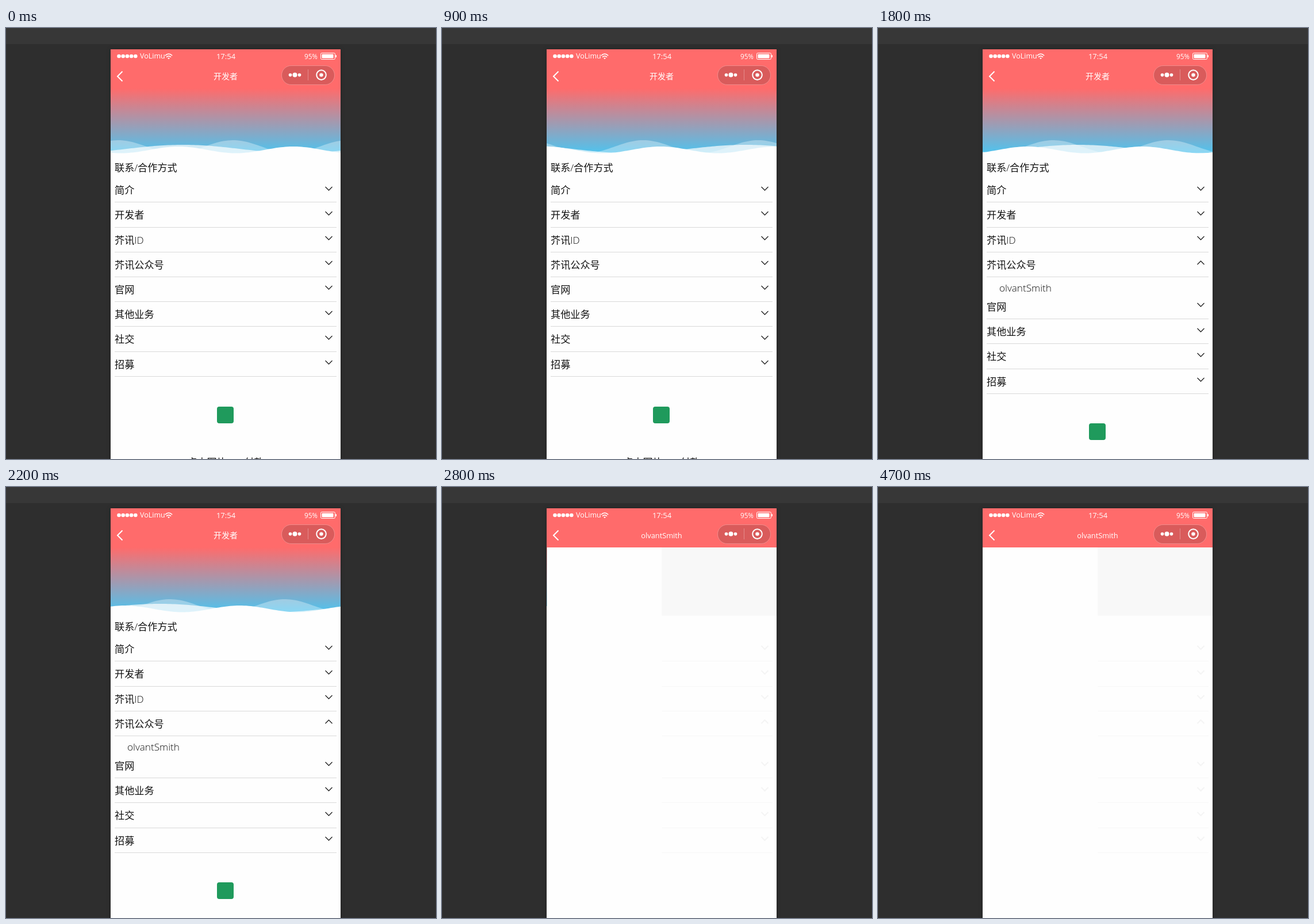
Animation, 748 px wide and 749 px high, one loop 8 s. Source, as an HTML page:

```html
<!DOCTYPE html>
<html lang="zh-CN">
<head>
<meta charset="utf-8">
<title>开发者</title>
<style>
  html, body { margin: 0; width: 100%; height: 100%; overflow: hidden; background: #2e2e2e; }
  svg { display: block; width: 100vw; height: 100vh; }
  text { font-family: "Open Sans", "Noto Sans CJK SC", "Noto Sans CJK", sans-serif; }
  .bar text { fill: #fff; }
  .page text { fill: #111; font-size: 17.15px; font-weight: 350; }
  .rule { stroke: #d9d9d9; }
  .arrow { fill: none; stroke: #222; stroke-width: 1.3; }
  .ghost .rule { stroke: #f7f7f7; }
  .ghost .arrow { stroke: #f4f4f4; stroke-width: 2; }
</style>
</head>
<body>
<svg viewBox="0 0 748 749" preserveAspectRatio="xMinYMin meet">
  <defs>
    <linearGradient id="sky" gradientUnits="userSpaceOnUse" x1="0" y1="105" x2="0" y2="223">
      <stop offset="0" stop-color="#ff6b6b"/>
      <stop offset="1" stop-color="#46c8f5"/>
    </linearGradient>
    <filter id="soft" x="-10%" y="-10%" width="120%" height="120%"><feGaussianBlur stdDeviation="4"/></filter>
    <clipPath id="screen"><rect x="182" y="37" width="400" height="712"/></clipPath>
    <clipPath id="rightHalf"><rect x="382.5" y="105" width="199.5" height="644"/></clipPath>
  </defs>

  <rect width="748" height="749" fill="#2e2e2e"/>
  <rect width="748" height="28" fill="#373737"/>
  <rect x="182" y="37" width="400" height="740" opacity=".2" filter="url(#soft)"/>
  <rect x="182" y="37" width="400" height="712" fill="#fefefe"/>

  <g id="page" class="page" clip-path="url(#screen)">
    <rect x="182" y="105" width="400" height="118" fill="url(#sky)"/>
    <g id="waves" fill="#fefefe"></g>
    <text x="189" y="248.7">联系/合作方式</text>
    <g id="list"></g>
    <text id="detail" x="211" y="458">olvantSmith</text>
    <g id="foot">
      <rect x="367" y="658" width="29" height="29" rx="4" fill="#1f9a5c"/>
      <text x="382" y="761" text-anchor="middle">点击图片App付款</text>
    </g>
  </g>

  <g id="ghost" class="ghost" clip-path="url(#rightHalf)">
    <rect x="382" y="105" width="200" height="644" fill="#fefefe"/>
    <rect x="382" y="105" width="200" height="118.5" fill="#f8f8f8"/>
    <g id="ghostList"></g>
  </g>
  <rect id="edge" x="182" y="105" width="1" height="102" fill="url(#sky)" opacity=".6"/>

  <g class="bar">
    <rect x="182" y="37" width="400" height="68" fill="#ff6b6b"/>
    <g id="signal" fill="#fff"></g>
    <text x="233" y="53" font-size="12.5">VoLimu</text>
    <path d="M276.8 48Q283 42 289.2 48M279 50.6Q283 46.8 287 50.6" fill="none" stroke="#fff" stroke-width="1.5"/>
    <path d="M281.2 52.4Q283 50.8 284.8 52.4L283 54.2Z" fill="#fff"/>
    <text x="382.5" y="53.5" font-size="13" text-anchor="middle">17:54</text>
    <text x="519" y="53.5" font-size="11.7">95%</text>
    <rect x="547.5" y="43.5" width="25" height="11" rx="2" fill="none" stroke="#fff"/>
    <rect x="549.5" y="45.5" width="20" height="7" rx="1" fill="#fff"/>
    <rect x="573.5" y="47" width="1.5" height="4" fill="#fff"/>
    <path d="M202.5 75.5L194 84L202.5 92.5" fill="none" stroke="#fff" stroke-width="2"/>
    <text id="title" x="382" y="88.5" text-anchor="middle"></text>
    <rect id="capsule" x="479.5" y="65.5" width="92" height="33" rx="16.5" stroke="#fff" stroke-opacity=".25"/>
    <path d="M525.5 72V91" stroke="#fff" stroke-opacity=".3"/>
    <g fill="#fff">
      <circle cx="494.5" cy="81.6" r="2.8"/>
      <circle cx="502.5" cy="81.6" r="4"/>
      <circle cx="510.5" cy="81.6" r="2.8"/>
      <circle cx="548.5" cy="81.6" r="3.2"/>
    </g>
    <circle cx="548.5" cy="81.6" r="8.3" fill="none" stroke="#fff" stroke-width="2"/>
  </g>
</svg>
<script>
const LOOP = 8000, STEP = 100;
const OPEN = 1000, PRESS = 2600, COVER = 2700, LEAVE = 2800, CLEAN = 3700;
const LABELS = ["简介", "开发者", "芥讯ID", "芥讯公众号", "官网", "其他业务", "社交", "招募"];
const OPEN_ROW = 3, ROW = 43.2, EXTRA = 30;

const $ = id => document.getElementById(id);
function add(parent, tag, attrs, text) {
  const el = document.createElementNS("http://www.w3.org/2000/svg", tag);
  for (const key in attrs) el.setAttribute(key, attrs[key]);
  if (text) el.textContent = text;
  parent.appendChild(el);
  return el;
}
const show = (el, on) => el.setAttribute("display", on ? "inline" : "none");

// crest: x at time 0, speed: px per second to the left
const waves = [
  { crest: 395, length: 200, speed: 50, top: 195, alpha: 0.33 },
  { crest: 308, length: 400, speed: 200, top: 203, alpha: 0.72 },
  { crest: 500, length: 200, speed: 400 / 3, top: 206, alpha: 1 }
];
const BOTTOM = 217.5;
for (const w of waves) w.el = add($("waves"), "path", { "fill-opacity": w.alpha });

function wavePath(w, sec) {
  const amp = (BOTTOM - w.top) / 2, crest = w.crest - w.speed * sec;
  let d = "M182 224";
  for (let x = 182; x <= 582; x += 4) {
    const y = BOTTOM - amp - amp * Math.cos(2 * Math.PI * (x - crest) / w.length);
    d += `L${x} ${y.toFixed(2)}`;
  }
  return d + "L582 224Z";
}

function buildRows(parent, withText) {
  return LABELS.map((label, i) => {
    const g = add(parent, "g");
    const at = y => Math.floor(y + i * ROW);
    if (withText) add(g, "text", { x: 189, y: at(288.6) }, label);
    add(g, "path", { class: "rule", d: `M189 ${at(302.9) + 0.5}H575` });
    const arrow = add(g, "path", { class: "arrow" });
    return { g, arrow, y: at(279) };
  });
}
function layoutRows(rows, open) {
  rows.forEach((r, i) => {
    const bend = open && i === OPEN_ROW ? -3 : 3;
    r.arrow.setAttribute("d", `M555.5 ${r.y - bend}L561.5 ${r.y + bend}L567.5 ${r.y - bend}`);
    r.g.setAttribute("transform", `translate(0 ${open && i > OPEN_ROW ? EXTRA : 0})`);
  });
}

for (let i = 0; i < 5; i++) add($("signal"), "circle", { cx: 196.5 + 7.2 * i, cy: 49, r: 3.3 });
const rows = buildRows($("list"), true);
layoutRows(buildRows($("ghostList"), false), true);

function draw(time) {
  const t = Math.floor(time / STEP) * STEP;
  const open = t >= OPEN, moved = t >= PRESS;
  for (const w of waves) w.el.setAttribute("d", wavePath(w, t / 1000));

  layoutRows(rows, open);
  show($("detail"), open);
  $("foot").setAttribute("transform", `translate(0 ${open ? 29 : 0})`);

  $("title").textContent = moved ? "olvantSmith" : "开发者";
  $("title").setAttribute("font-size", moved ? 12.8 : 14);
  $("capsule").setAttribute("fill", moved && t < COVER ? "#9b4040" : "#d95b5b");

  show($("page"), t < LEAVE);
  show($("ghost"), t >= COVER);
  show($("edge"), t >= LEAVE && t < CLEAN);
}

const start = performance.now();
function tick() {
  draw((performance.now() - start) % LOOP);
  requestAnimationFrame(tick);
}
tick();
</script>
</body>
</html>
```
